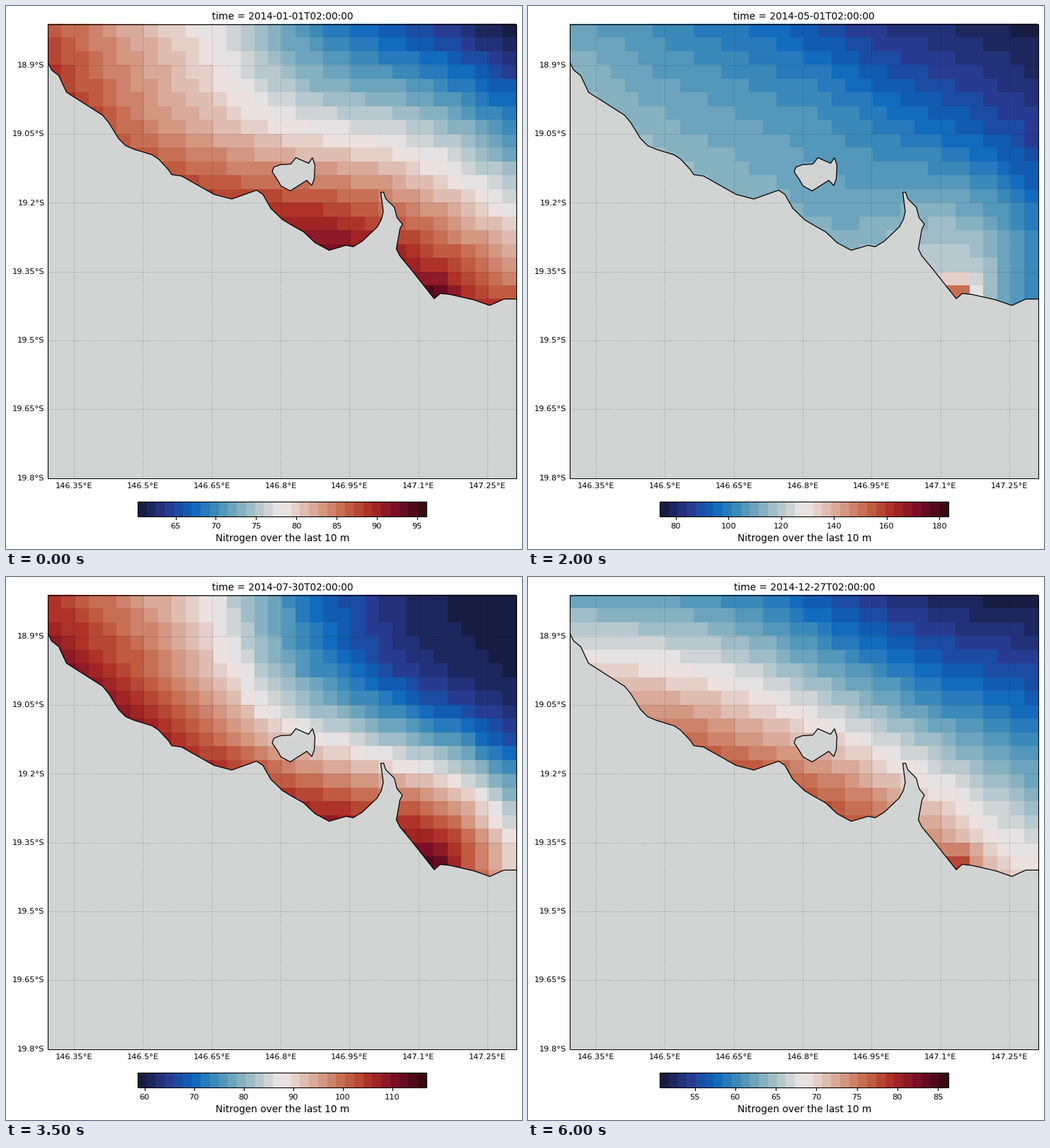
A matplotlib script that plays this animation: 729x768 px, repeating every 6.5 s.

```python
import numpy as np
import matplotlib.pyplot as plt
from matplotlib.animation import FuncAnimation
from matplotlib.colors import LinearSegmentedColormap
from matplotlib.patches import Polygon, Rectangle

W, H, DPI = 729, 768, 100
COLS, ROWS, CELL = 34, 21, 19.457
LEFT, TOP = 59.5, 25.5
RIGHT, BOTTOM = LEFT + COLS * CELL, TOP + 33 * CELL
BAR = (186.5, 594.5, 701.3, 721.6)
LEVELS = 32
LAND = "#d2d4d3"
TICK_PX, TITLE_PX = 11.375, 13.65

plt.rcParams["font.family"] = "DejaVu Sans"

SHADES = ["#171c42", "#293a8f", "#0b66bd", "#4590b9", "#8eb5c2", "#d2d6d7",
          "#e6d2cc", "#d59d89", "#c46548", "#ac2b24", "#780e28", "#3c0911"]
stops = [(i / 11, c) for i, c in enumerate(SHADES)]
stops.insert(6, (0.5, "#eeeae9"))
CMAP = LinearSegmentedColormap.from_list("balance", stops, N=LEVELS)

COAST = [(59, 80), (64, 90), (74, 98), (85, 121.5), (136, 154), (145, 165),
         (158.5, 187), (168.5, 197), (180, 202), (206, 210), (215, 216),
         (229, 231), (233.5, 238), (247.5, 240), (293.5, 266), (318.5, 272.5),
         (353.5, 260), (362.5, 266), (373.5, 285.5), (390, 301.5),
         (400.5, 308), (420, 319), (436.5, 334.5), (456, 345), (480, 338),
         (490, 340), (503, 332), (524, 312), (530, 301), (532.5, 290),
         (529, 263), (533, 263), (536, 272), (548, 284), (552, 299),
         (559.5, 308), (556, 315), (551, 343), (556, 353), (570.5, 370.5),
         (604.5, 413.5), (613, 406), (627, 407.5), (660, 415), (683, 423),
         (703, 414), (721, 414)]
ISLAND = [(375.5, 234), (378, 227.5), (387, 224), (402, 223), (409, 214),
          (427, 222), (432.5, 214), (436, 225), (435, 244), (431.5, 253.5),
          (424.5, 246), (401, 261), (388, 254), (383.5, 246)]

# Places (column, row) where the nitrogen level is known.
STATIONS = np.array([(0, 0), (11, 0), (21, 0), (33, 0), (7, 7), (18, 5),
                     (27, 6), (33, 10), (20, 14), (29, 16), (33, 19)], float)

# Month: lowest and highest value, strength of the river plume, then the
# level at each station in percent of the colour range.
SURVEYS = {
    0: (60.34, 96.2, 9, 74, 50, 23, 1, 67, 42, 37, 38, 82, 72, 72),
    2: (67.3, 224.2, 42, 8, 5, 3, 1, 9, 9, 12, 18, 14, 24, 18),
    4: (73.96, 183.5, 34, 33, 23, 11, 2, 35, 26, 17, 16, 34, 40, 27),
    5: (70.55, 117, 10, 79, 52, 40, 1, 70, 57, 48, 47, 74, 72, 67),
    7: (58.7, 117, 9, 79, 51, 15, 1, 76, 31, 11, 15, 74, 71, 56),
    10: (60.56, 84.4, 11, 96, 73, 39, 2, 86, 57, 46, 44, 71, 55, 63),
    12: (50.7, 86.35, 14, 34, 28, 12, 1, 60, 34, 21, 26, 68, 52, 50),
}
SERIES = np.array(list(SURVEYS.values())).T


def spline_terms(points):
    """Thin-plate terms and a plane, for each point."""
    r2 = ((points[:, None] - STATIONS) ** 2).sum(axis=2)
    bend = r2 * np.log(r2 + 1e-9)
    return np.hstack([bend, np.ones((len(points), 1)), points])


def influence_maps():
    """How much each station counts in each cell."""
    n = len(STATIONS)
    top = spline_terms(STATIONS)
    system = np.vstack([top, np.hstack([top[:, n:].T, np.zeros((3, 3))])])
    return spline_terms(CELLS) @ np.linalg.inv(system)[:, :n]


rows, cols = np.mgrid[:ROWS, :COLS]
CELLS = np.column_stack([cols.ravel(), rows.ravel()]).astype(float)
INFLUENCE = influence_maps()
PLUME = np.exp(-((cols - 27.6) ** 2 + (rows - 19.2) ** 2) / 1.6)


def survey(month):
    low, high, plume, *levels = (np.interp(month, list(SURVEYS), s)
                                 for s in SERIES)
    field = (INFLUENCE @ levels).reshape(ROWS, COLS) + plume * PLUME
    return low, high, field


fig = plt.figure(figsize=(W / DPI, H / DPI), dpi=DPI, facecolor="white")
ax = fig.add_axes([0, 0, 1, 1])


def label(x, y, text, px=TICK_PX, ha="center"):
    return ax.text(x, y, text, fontsize=px * 72 / DPI, ha=ha, va="baseline")


def raster(data, top, x0, x1, y0, y1):
    return ax.imshow(data, cmap=CMAP, vmin=0, vmax=top, aspect="auto",
                     extent=(x0, x1, y1, y0), interpolation="nearest")


def frame_box(x0, x1, y0, y1):
    ax.add_patch(Rectangle((x0, y0), x1 - x0, y1 - y0, fill=False,
                           ec="black", lw=0.8, zorder=6))


sea = raster(np.zeros((ROWS, COLS)), 100, LEFT, RIGHT, TOP, TOP + ROWS * CELL)
raster(np.arange(LEVELS)[None, :], LEVELS - 1, *BAR)

coast, island = np.array(COAST) + 0.5, np.array(ISLAND) + 0.5
shore = np.vstack([coast, [(RIGHT, BOTTOM), (LEFT, BOTTOM)]])
ax.add_patch(Polygon(shore, fc=LAND, ec="none", zorder=2))
ax.add_patch(Polygon(island, fc=LAND, ec="black", lw=0.9, zorder=5))
ax.plot(*coast.T, color="black", lw=0.9, zorder=5)

rule = dict(color="black", alpha=0.2, lw=0.55, ls="--", zorder=4)
for i in range(7):
    x, y = LEFT + (1.886 + 5 * i) * CELL, TOP + (3 + 5 * i) * CELL
    ax.plot([x, x], [TOP, BOTTOM], **rule)
    ax.plot([LEFT, RIGHT], [y, y], **rule)
    label(x, 682, f"{round(146.35 + 0.15 * i, 2):g}°E")
    label(54.6, y + 3.2, f"{round(18.9 + 0.15 * i, 2):g}°S", ha="right")

frame_box(LEFT, RIGHT, TOP, BOTTOM)
frame_box(*BAR)
middle = (LEFT + RIGHT) / 2
label(middle, 757.5, "Nitrogen over the last 10 m", TITLE_PX)
title = label(middle, 18.7, "", TITLE_PX)

ticks = []
for _ in range(10):
    mark, = ax.plot([], [], color="black", lw=0.8)
    ticks.append((mark, label(0, 739, "")))

ax.set_xlim(0, W)
ax.set_ylim(H, 0)
ax.axis("off")


def update(month):
    low, high, field = survey(month)
    sea.set_data(field)
    day = np.datetime64("2014-01-01") + 30 * month
    title.set_text(f"time = {day}T02:00:00")

    step = next(s for s in (5, 10, 20, 50) if (high - low) / s <= 8)
    values = np.arange(np.ceil(low / step) * step, high, step)
    for i, (mark, text) in enumerate(ticks):
        shown = i < len(values)
        mark.set_visible(shown)
        text.set_visible(shown)
        if shown:
            x = np.interp(values[i], [low, high], BAR[:2])
            mark.set_data([x, x], [BAR[3], BAR[3] + 4])
            text.set_x(x)
            text.set_text(f"{values[i]:.0f}")
    return [sea, title]


anim = FuncAnimation(fig, update, frames=13, interval=500,
                     repeat=True, repeat_delay=0, blit=False)
plt.show()
```
